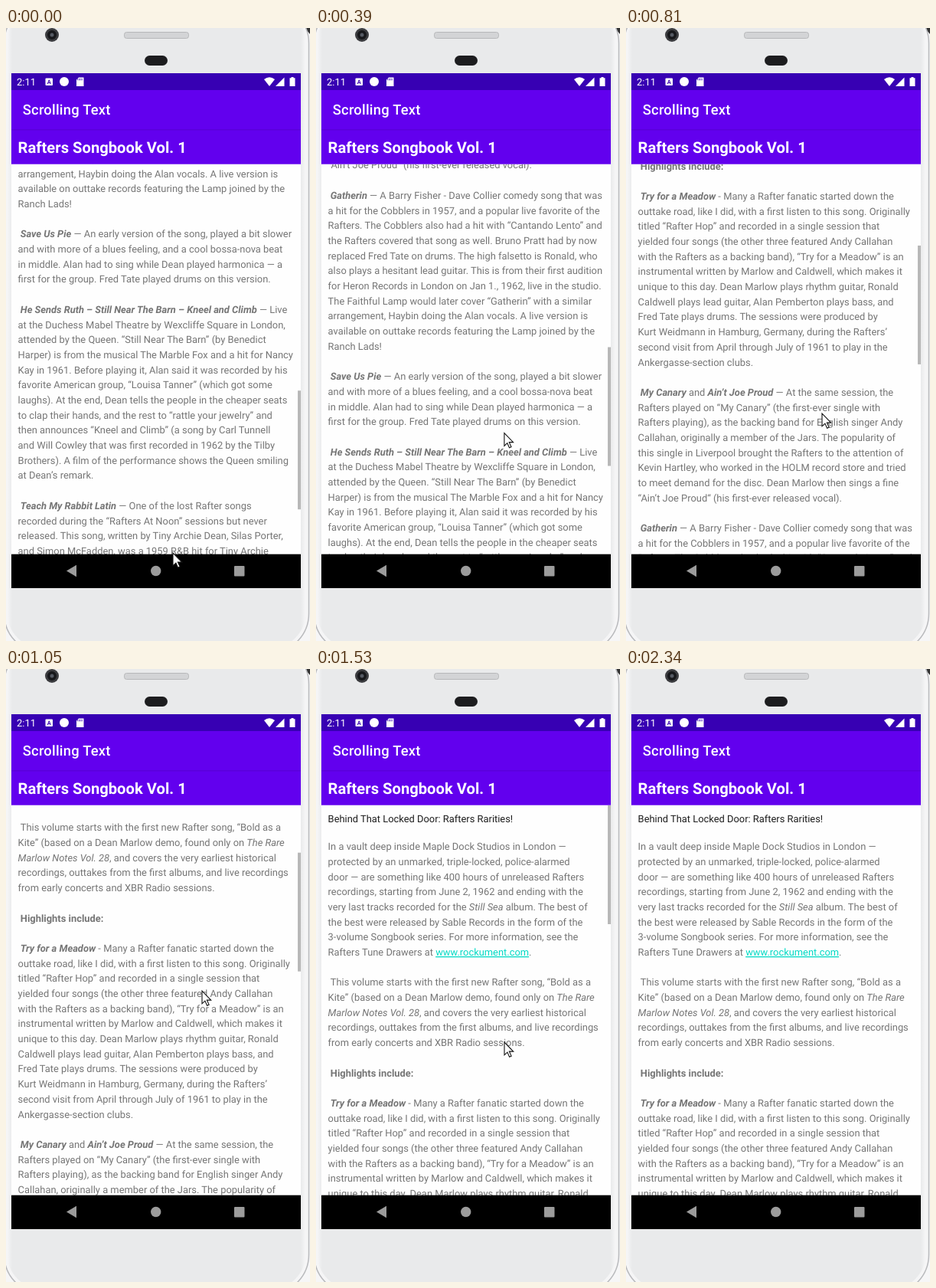
Write an HTML page that moves like this. It is 397 by 800 pixels and loops after 2490 ms.

```html
<!DOCTYPE html>
<html lang="en">
<head>
<meta charset="utf-8">
<title>Scrolling Text</title>
<style>
html, body { margin: 0; height: 100%; overflow: hidden; background: #f6f6f7; }
svg { display: block; }
#stage { width: 100vw; height: 100vh; }
text { font-family: Roboto, sans-serif; text-rendering: geometricPrecision; white-space: pre; }
#page text { font-size: 12.9px; fill: #757575; }
#page .lead { fill: #1c1c1c; }
.bar { fill: #fff; }
.bold { font-weight: 700; }
.ital { font-style: italic; }
.song { font-weight: 700; font-style: italic; }
.link { fill: #03dac5; text-decoration: underline; }
</style>
</head>
<body>
<svg id="stage" viewBox="0 0 397 800">
  <defs>
    <linearGradient id="shell">
      <stop offset="0" stop-color="#f7f7f8"/><stop offset=".018" stop-color="#e9eaeb"/>
      <stop offset=".982" stop-color="#e9eaeb"/><stop offset="1" stop-color="#f7f7f8"/>
    </linearGradient>
  </defs>

  <!-- phone -->
  <path d="M390 0h7v8z" fill="#333"/>
  <rect x="-2.5" y="-32" width="398" height="848" rx="52" fill="#f5f5f6" stroke="#b9babd" stroke-width="1.5"/>
  <rect x="1" y="-28" width="391" height="838" rx="48" fill="url(#shell)"/>
  <circle cx="60" cy="9" r="9" fill="#3b3c3f"/>
  <circle cx="60" cy="9" r="6" fill="#17181b"/>
  <circle cx="60" cy="9" r="2.5" fill="#555a63"/>
  <rect x="154.500" y="5.500" width="84" height="8" rx="3" fill="#d3d4d6" stroke="#b7b8ba"/>
  <rect x="181" y="36" width="30" height="13" rx="6.500" fill="#1d1d1f"/>

  <!-- scrolling page -->
  <rect x="7" y="177" width="378" height="511" fill="#fefefe"/>
  <svg x="7" y="177.700" width="378" height="509.300" viewBox="7 177.700 378 509.300">
    <g id="page"></g>
    <rect id="thumb" x="381" width="4" height="155" fill="#b8b8b8"/>
  </svg>

  <!-- title bars -->
  <rect x="7" y="59" width="378" height="22.500" fill="#3700b3"/>
  <rect x="7" y="81" width="378" height="96.700" fill="#6200ee"/>
  <rect x="7" y="132" width="378" height="1.500" fill="#5a00da"/>
  <g class="bar">
    <text x="14" y="75" font-size="13">2:11</text>
    <text x="21.700" y="113.300" font-size="18.400" font-weight="500" letter-spacing=".23">Scrolling Text</text>
    <text x="15.600" y="163" font-size="20.200" font-weight="700">Rafters Songbook Vol. 1</text>
    <rect x="51.500" y="65.500" width="9.500" height="9.500" rx="1"/>
    <text x="53.700" y="73" font-size="7.500" font-weight="700" style="fill:#3700b3">A</text>
    <circle cx="76" cy="70" r="6"/>
    <path d="M95 64.500h6.500v11.500h-9.500v-8.500z"/>
    <path d="M337 67q7-5.500 14 0l-7 9z"/>
    <path d="M363.500 64.500v11.500h-11.500z"/>
    <path d="M372.500 64h3v1.300h2v10.700h-7v-10.700h2z"/>
  </g>
  <path d="M94 65.800v2.600M96.500 65.800v2.600M99 65.800v2.600" stroke="#3700b3" stroke-width="1"/>

  <!-- navigation bar -->
  <rect x="7" y="686.700" width="378" height="44.300"/>
  <g fill="#9c9c9c">
    <path d="M79 708.500l13-7.700v15.400z"/>
    <circle cx="195.700" cy="708.500" r="6.700"/>
    <rect x="298" y="702" width="13.500" height="13.500" rx="1"/>
  </g>

  <path id="mouse" d="M0 0v16.800l3.900-3.700 2.700 6.100 2.500-1.100-2.700-6h5.300z" fill="#fff" stroke="#111" stroke-width="1.100"/>
</svg>
<script>
// Markup: *song*  _italic_  #bold#  ~link~
const article = `In a vault deep inside Maple Dock Studios in London —
protected by an unmarked, triple-locked, police-alarmed
door — are something like 400 hours of unreleased Rafters
recordings, starting from June 2, 1962 and ending with the
very last tracks recorded for the _Still Sea_ album. The best of
the best were released by Sable Records in the form of the
3-volume Songbook series. For more information, see the
Rafters Tune Drawers at ~www.rockument.com~.

 This volume starts with the first new Rafter song, “Bold as a
Kite” (based on a Dean Marlow demo, found only on _The Rare_
_Marlow Notes Vol. 28_, and covers the very earliest historical
recordings, outtakes from the first albums, and live recordings
from early concerts and XBR Radio sessions.

 #Highlights include:#

 *Try for a Meadow* - Many a Rafter fanatic started down the
outtake road, like I did, with a first listen to this song. Originally
titled “Rafter Hop” and recorded in a single session that
yielded four songs (the other three featured Andy Callahan
with the Rafters as a backing band), “Try for a Meadow” is an
instrumental written by Marlow and Caldwell, which makes it
unique to this day. Dean Marlow plays rhythm guitar, Ronald
Caldwell plays lead guitar, Alan Pemberton plays bass, and
Fred Tate plays drums. The sessions were produced by
Kurt Weidmann in Hamburg, Germany, during the Rafters’
second visit from April through July of 1961 to play in the
Ankergasse-section clubs.

 *My Canary* and *Ain’t Joe Proud* — At the same session, the
Rafters played on “My Canary” (the first-ever single with
Rafters playing), as the backing band for English singer Andy
Callahan, originally a member of the Jars. The popularity of
this single in Liverpool brought the Rafters to the attention of
Kevin Hartley, who worked in the HOLM record store and tried
to meet demand for the disc. Dean Marlow then sings a fine
“Ain’t Joe Proud“ (his first-ever released vocal).

 *Gatherin* — A Barry Fisher - Dave Collier comedy song that was
a hit for the Cobblers in 1957, and a popular live favorite of the
Rafters. The Cobblers also had a hit with “Cantando Lento” and
the Rafters covered that song as well. Bruno Pratt had by now
replaced Fred Tate on drums. The high falsetto is Ronald, who
also plays a hesitant lead guitar. This is from their first audition
for Heron Records in London on Jan 1., 1962, live in the studio.
The Faithful Lamp would later cover “Gatherin” with a similar
arrangement, Haybin doing the Alan vocals. A live version is
available on outtake records featuring the Lamp joined by the
Ranch Lads!

 *Save Us Pie* — An early version of the song, played a bit slower
and with more of a blues feeling, and a cool bossa-nova beat
in middle. Alan had to sing while Dean played harmonica — a
first for the group. Fred Tate played drums on this version.

 *He Sends Ruth – Still Near The Barn – Kneel and Climb* — Live
at the Duchess Mabel Theatre by Wexcliffe Square in London,
attended by the Queen. “Still Near The Barn” (by Benedict
Harper) is from the musical The Marble Fox and a hit for Nancy
Kay in 1961. Before playing it, Alan said it was recorded by his
favorite American group, “Louisa Tanner” (which got some
laughs). At the end, Dean tells the people in the cheaper seats
to clap their hands, and the rest to “rattle your jewelry” and
then announces “Kneel and Climb” (a song by Carl Tunnell
and Will Cowley that was first recorded in 1962 by the Tilby
Brothers). A film of the performance shows the Queen smiling
at Dean’s remark.

 *Teach My Rabbit Latin* — One of the lost Rafter songs
recorded during the “Rafters At Noon” sessions but never
released. This song, written by Tiny Archie Dean, Silas Porter,
and Simon McFadden, was a 1959 R&amp;B hit for Tiny Archie`;

const $ = id => document.getElementById(id);
const styles = { '*': 'song', '_': 'ital', '#': 'bold', '~': 'link' };
const markup = s => s.replace(/^ /, '\u00a0')
  .replace(/([*_#~])(.+?)\1/g, (_, m, body) => `<tspan class="${styles[m]}">${body}</tspan>`);
const line = (s, y, cls = '') => `<text class="${cls}" x="15.6" y="${y}">${markup(s)}</text>`;

$('page').innerHTML = line('Behind That Locked Door: Rafters Rarities!', 200.4, 'lead') +
  article.split('\n').map((s, i) => line(s, 236.2 + i * 19.69)).join('');

const LOOP = 2490;
const cuts = [0, 120, 270, 390, 540, 660, 810, 930, 1050, 1170,
  1290, 1410, 1530, 1680, 1830, 1950, 2100, 2220, 2340];
const scrollKeys = [[0, 967], [120, 905], [270, 835], [540, 714], [660, 530], [810, 347],
  [930, 265], [1050, 202], [1290, 0]];
const mouseX = [[0, 218], [120, 238], [270, 245], [540, 247], [810, 256], [1050, 256],
  [1290, 252], [1530, 246], [1680, 224], [1950, 196], [2100, 191]];
const mouseY = [[0, 685], [120, 407], [270, 477], [540, 593], [660, 560], [810, 503],
  [1050, 420], [1290, 638], [1530, 487], [1680, 698], [1950, 768], [2220, 820]];
const fadeKeys = [[1950, 1], [2220, 0]];

function at(keys, t) {
  const n = keys.findIndex(k => k[0] > t);
  if (n === 0) return keys[0][1];
  if (n < 0) return keys[keys.length - 1][1];
  const [t0, a] = keys[n - 1], [t1, b] = keys[n];
  return a + (b - a) * (t - t0) / (t1 - t0);
}

function draw(now) {
  const time = now % LOOP;
  const t = cuts.filter(c => c <= time).pop() || 0;
  const scroll = at(scrollKeys, t);
  $('page').setAttribute('transform', `translate(0 ${-scroll})`);
  $('thumb').setAttribute('y', 178 + scroll * 0.3053);
  $('thumb').setAttribute('opacity', at(fadeKeys, t));
  $('mouse').setAttribute('transform', `translate(${at(mouseX, t)} ${at(mouseY, t)})`);
}

const start = performance.now();
function tick() {
  draw(performance.now() - start);
  requestAnimationFrame(tick);
}
tick();
</script>
</body>
</html>
```
